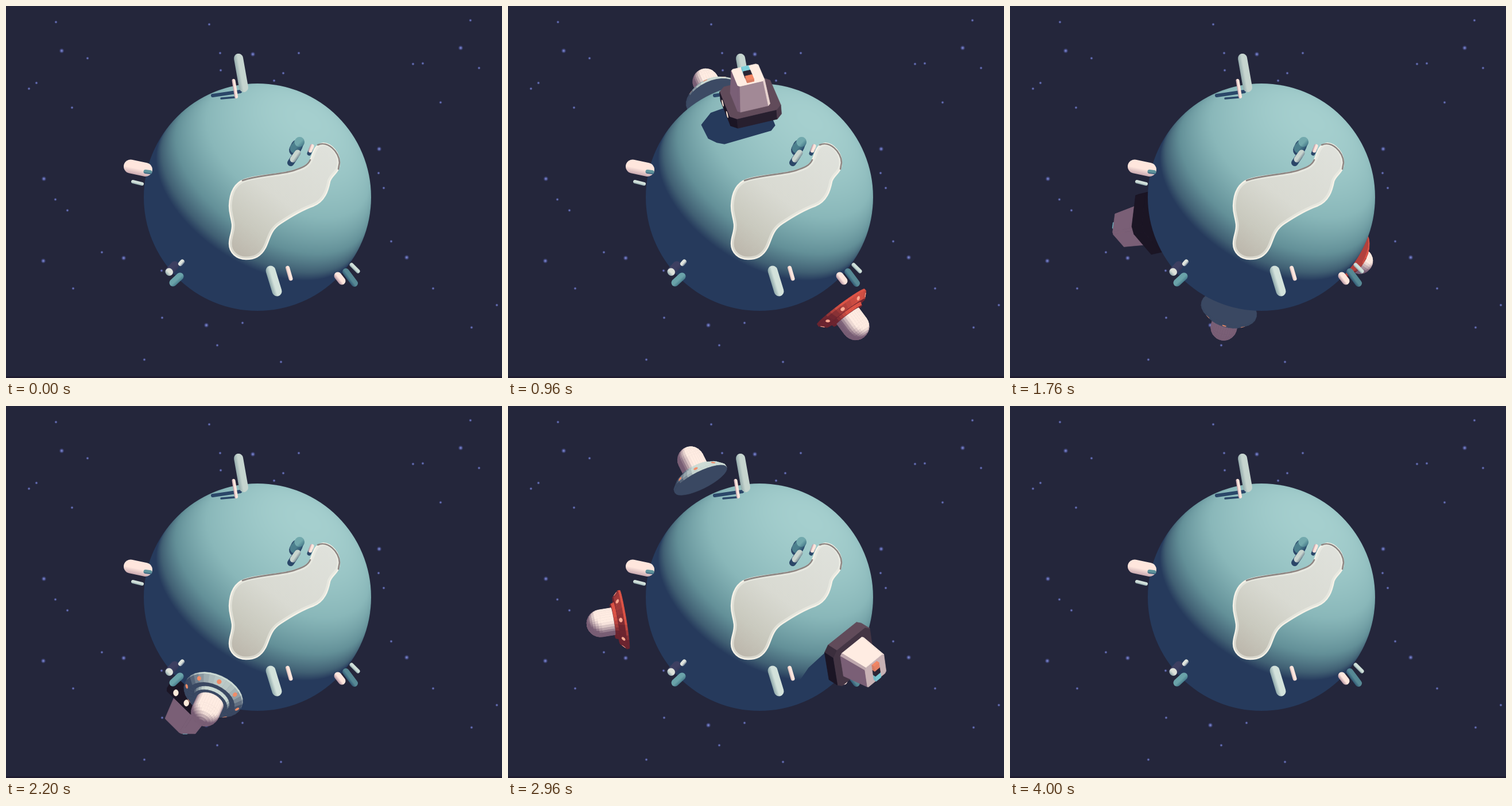
Write an HTML page with a canvas that moves like this. It is 864 px wide and 648 px high and loops after 4.04 s.

```html
<!DOCTYPE html>
<html lang="en">
<head>
<meta charset="utf-8">
<title>Little planet</title>
<style>
html, body { margin: 0; width: 100%; height: 100%; overflow: hidden; background: #24263b; }
canvas { display: block; }
</style>
</head>
<body>
<canvas id="stage" width="864" height="648"></canvas>
<script>
const W = 864, H = 648, CX = 438, CY = 333, R = 198, LOOP = 4.04, TAU = Math.PI * 2;
const NAVY = [38, 58, 92];
const ctx = document.getElementById('stage').getContext('2d');

// ---------- helpers ----------
const dot = (a, b) => a[0] * b[0] + a[1] * b[1] + a[2] * b[2];
const sub = (a, b) => a.map((v, i) => v - b[i]);
const cross = (a, b) => [a[1] * b[2] - a[2] * b[1], a[2] * b[0] - a[0] * b[2], a[0] * b[1] - a[1] * b[0]];
const unit = a => { const l = Math.hypot(...a) || 1; return a.map(v => v / l); };
const blend = (a, p, b, q) => a.map((v, i) => v * p + b[i] * q);
const mix = (a, b, k) => blend(a, 1 - k, b, k);
const clamp = v => Math.max(0, Math.min(1, v));
const rgb = c => `rgb(${c.map(Math.round)})`;
const LIGHT = unit([.45, -.68, .58]);

function layer(paint) {
  const c = document.createElement('canvas');
  c.width = W; c.height = H;
  paint(c.getContext('2d'));
  return c;
}

function planetClip(g) {
  g.beginPath();
  g.arc(CX, CY, R, 0, TAU);
  g.clip();
}

// ---------- sky ----------
const bigStars = [97,78, 430,84, 792,73, 650,249, 66,301, 65,444, 205,439, 349,556, 698,438];
const smallStars = [87,28, 354,32, 142,91, 373,82, 374,112, 510,82, 483,117, 467,130, 709,101, 726,100,
  824,108, 809,25, 757,168, 53,134, 40,144, 115,177, 649,291, 658,317, 86,337, 107,356, 167,429, 117,492,
  271,461, 272,543, 412,552, 368,591, 241,616, 479,620, 671,410, 744,492, 855,521, 811,560];

const sky = layer(g => {
  g.fillStyle = '#24263b';
  g.fillRect(0, 0, W, H);
  g.fillStyle = '#1e1b2f';
  g.fillRect(0, 645, W, 3);
  const star = (x, y, r) => {
    const glow = g.createRadialGradient(x, y, 0, x, y, r);
    glow.addColorStop(0, 'rgba(142,152,226,1)');
    glow.addColorStop(.4, 'rgba(104,114,192,.75)');
    glow.addColorStop(1, 'rgba(70,78,150,0)');
    g.fillStyle = glow;
    g.fillRect(x - r, y - r, 2 * r, 2 * r);
  };
  for (let i = 0; i < bigStars.length; i += 2) star(bigStars[i], bigStars[i + 1], 4.6);
  for (let i = 0; i < smallStars.length; i += 2) star(smallStars[i], smallStars[i + 1], 2.9);
});

// ---------- planet ----------
const ramp = [[0, NAVY], [.1, [64, 95, 115]], [.3, [99, 144, 152]], [.6, [137, 183, 185]], [1, [165, 207, 206]]];

function rampColor(d) {
  if (d <= 0) return NAVY;
  const i = ramp.findIndex(s => s[0] >= d);
  if (i < 1) return ramp[ramp.length - 1][1];
  const [a, ca] = ramp[i - 1], [b, cb] = ramp[i];
  return mix(ca, cb, (d - a) / (b - a));
}

const planet = layer(g => {
  const size = 2 * R + 4, img = g.createImageData(size, size);
  for (let j = 0; j < size; j++) for (let i = 0; i < size; i++) {
    let x = (i - R - 1.5) / R, y = (j - R - 1.5) / R;
    const q = Math.max(1, Math.hypot(x, y));
    x /= q; y /= q;
    const z = Math.sqrt(Math.max(0, 1 - x * x - y * y));
    const c = rampColor(dot([x, y, z], LIGHT));
    img.data.set([c[0], c[1], c[2], 255], (j * size + i) * 4);
  }
  const raw = layer(o => o.putImageData(img, CX - R - 2, CY - R - 2));
  planetClip(g);
  g.drawImage(raw, 0, 0);
});

// ---------- crater and pillars ----------
function capsule(g, x1, y1, x2, y2, w, lit, dark) {
  const a = Math.atan2(y2 - y1, x2 - x1), len = Math.hypot(x2 - x1, y2 - y1), r = w / 2;
  // Shade across the pillar, bright on the side facing the light.
  const side = Math.sin(a) * -LIGHT[0] + Math.cos(a) * LIGHT[1] > 0 ? 1 : -1;
  const shade = g.createLinearGradient(0, side * r, 0, -side * r);
  shade.addColorStop(0, lit);
  shade.addColorStop(.55, lit);
  shade.addColorStop(1, dark);
  g.save();
  g.translate(x1, y1);
  g.rotate(a);
  g.fillStyle = shade;
  g.beginPath();
  g.roundRect(-r, -r, len + w, w, r);
  g.fill();
  g.restore();
}

function stroke(g, path, color, width) {
  g.strokeStyle = color;
  g.lineWidth = width;
  g.stroke(path);
}

const decor = layer(g => {
  g.lineCap = 'round';
  const crater = new Path2D('M553 239C568 240 581 256 581 273C581 291 567 294 564 306C561 322 555 340 536 348' +
    'C516 355 496 367 478 379C460 391 460 405 452 421C444 436 433 441 418 441C402 441 389 430 389 414' +
    'C389 400 395 394 394 380C392 365 389 362 389 348C390 322 399 308 416 302C440 294 476 294 500 287' +
    'C515 282 525 279 530 268C536 255 537 241 553 239Z');
  const floor = g.createLinearGradient(560, 250, 420, 440);
  floor.addColorStop(0, '#dfe1db');
  floor.addColorStop(.5, '#d9dad2');
  floor.addColorStop(.8, '#c9c9be');
  floor.addColorStop(1, '#bdb8ad');
  g.fillStyle = floor;
  g.fill(crater);
  g.save();
  g.clip(crater);
  stroke(g, crater, 'rgba(240,240,232,.55)', 9);
  g.restore();
  stroke(g, crater, '#f6f2e8', 2.4);
  stroke(g, new Path2D('M412 304C440 294 476 294 500 287C515 282 525 279 530 268M543 242C560 234 581 254 581 273L579 284'),
    '#8d8582', 2.6);

  const shadow = (d, w) => stroke(g, new Path2D(d), '#2b4769', w);
  g.save();
  planetClip(g);
  shadow('M360 156L408 149', 6);
  shadow('M375 161L398 159', 3.5);
  shadow('M507 243L503 251', 20);
  shadow('M504 261L496 273', 12);
  shadow('M531 250L528 257', 7);
  g.restore();

  const pale = '#cfdfd9', grey = '#8ba5a8', pink = '#ffe6dd', mauve = '#b493a0';
  capsule(g, 414, 142, 405, 91, 16, '#c6d5cf', '#93aaab');
  capsule(g, 401, 158, 396.5, 130, 6, pink, mauve);
  capsule(g, 243, 285, 217, 279.5, 24, pink, '#c9a9b0');
  capsule(g, 243, 288.5, 251, 289.5, 7, '#5f949c', '#34597a');
  capsule(g, 237, 310, 221, 306, 6, '#d2e0da', grey);
  capsule(g, 511, 238, 503, 248, 17, '#4c7f8d', '#315873');
  capsule(g, 511, 237, 511.5, 236.5, 17, '#72a9ad', '#487d8c');
  capsule(g, 500, 267, 508, 256, 11, '#c9d5cf', '#7d8f98');
  capsule(g, 530, 252, 533, 244, 7, pink, mauve);
  capsule(g, 294, 452, 285, 462, 15, '#3d3f61', '#343859');
  capsule(g, 284, 463, 284.5, 463.5, 13, '#dde2da', grey);
  capsule(g, 304, 449, 307, 445.5, 8, '#dfe4dd', '#6b7d93');
  capsule(g, 303, 471, 291, 482, 13, '#6aa3a9', '#477b8b');
  capsule(g, 461, 461, 472, 497, 17, '#d3e2db', grey);
  capsule(g, 490.5, 456, 496, 475, 7, pink, '#cfb5b3');
  capsule(g, 578, 470, 585, 479, 13, pink, mauve);
  capsule(g, 592, 463, 607, 483, 12, '#568894', '#2f5672');
  capsule(g, 602, 451, 613, 462, 7, pale, grey);
});

// ---------- ship models: parts stacked along the up axis, points are [x, height, front] ----------
const SKIN = { lit: [255, 236, 226], dark: [122, 95, 118] };
const PALE = { lit: [205, 219, 213], dark: [58, 72, 98] };
const RED = { lit: [222, 84, 70], dark: [108, 37, 48] };
const PLUM = { lit: [97, 75, 90], dark: [27, 21, 36] };
const glow = c => ({ lit: c, dark: c });

function face(pts, mat, inside) {
  const mid = pts.reduce((s, p) => blend(s, 1, p, 1 / pts.length), [0, 0, 0]);
  let n = unit(cross(sub(pts[1], pts[0]), sub(pts[2], pts[0])));
  if (dot(n, sub(mid, inside)) < 0) n = n.map(v => -v);
  return { pts, mat, n, mid };
}

const ring = (n, fn) => Array.from({ length: n }, (_, i) => fn(i / n * TAU));

function saucer(hull, lamp) {
  const SEG = 32, dome = 23.5;
  const profile = [[51, 0], [51, 4], [41, 14], [32, 14], [30, 20], [dome, 20], [dome, 42]];
  for (let i = 1; i <= 7; i++) {
    const a = i / 7 * TAU / 4;
    profile.push([dome * Math.cos(a), 42 + dome * Math.sin(a)]);
  }
  const at = (r, h, a) => [r * Math.cos(a), h, r * Math.sin(a)];
  const parts = [[face(ring(SEG, a => at(51, 0, a)), hull, [0, 9, 0])]];
  for (let i = 1; i < profile.length; i++) {
    const [r1, h1] = profile[i - 1], [r2, h2] = profile[i];
    const inside = [0, (h1 + h2) / 2 - 4, 0], mat = i > 5 ? SKIN : hull;
    parts.push(ring(SEG, a => {
      const b = a + TAU / SEG;
      return face([at(r1, h1, a), at(r1, h1, b), at(r2, h2, b), at(r2, h2, a)], mat, inside);
    }));
  }
  parts[2].push(...ring(8, a => face(ring(10, b => {
    const k = Math.sin(b) * 2.6;
    return at(46 - k, 9 + k, a + Math.cos(b) * .08);
  }), glow(lamp), [0, 5, 0])));
  return parts;
}

const foot = (w, d, c) => [[w - c, d], [w, d - c], [w, c - d], [w - c, -d], [c - w, -d], [-w, c - d], [-w, d - c], [c - w, d]];

function prism(base, h0, h1, taper, mat, dx = 0) {
  const low = base.map(([x, f]) => [x + dx, h0, f]);
  const top = base.map(([x, f]) => [x * taper + dx, h1, f * taper]);
  const inside = [dx, (h0 + h1) / 2, 0];
  return [face(low, mat, inside), face(top, mat, inside), ...low.map((p, i) => {
    const j = (i + 1) % low.length;
    return face([p, low[j], top[j], top[i]], mat, inside);
  })];
}

function truck() {
  const base = prism(foot(43, 44, 10), 0, 20, 1, PLUM);
  for (const x of [-15, 15])
    base.push(face(ring(14, a => [x + 5.6 * Math.cos(a), 10 + 5.6 * Math.sin(a), 44.2]), glow([255, 234, 218]), [0, 10, 0]));
  const colors = [[125, 208, 218], [42, 35, 50], [243, 134, 100]];
  return [base, prism(foot(28, 28, 4), 20, 71, .83, SKIN),
    colors.flatMap((c, i) => prism(foot(6, 6, .5), 71, 76, 1, { lit: c, dark: mix(c, NAVY, .15) }, i * 12 - 12))];
}

// Keys: seconds, direction from the planet's centre, turn in degrees.
const ships = [
  { alt: 238, parts: saucer(PALE, [240, 140, 104]), spin: 180, keys: [
    [0, .2, 0, -.98], [.64, 0, -.74, -.67], [1.28, -.736, -.51, -.445], [1.54, -.9, .25, -.35],
    [1.76, -.243, .84, -.48], [2, -.15, .95, .2], [2.56, -.45, -.357, .82], [2.9, -.45, -.87, -.1], [3.36, -.2, -.4, -.9]] },
  { alt: 238, parts: saucer(RED, [255, 172, 148]), spin: 180, keys: [
    [0, .12, .5, -.86], [.64, .186, .98, -.1], [1.28, .886, .43, .17], [1.76, .646, .418, -.64], [2.3, 0, .1, -1],
    [2.56, -.5, 0, -.87], [2.8, -.95, .05, -.3], [2.95, -.98, .15, .1], [3.36, -.24, .575, .78], [3.7, .1, .98, .2]] },
  { alt: 210, parts: truck(), spin: 720, keys: [
    [0, .25, -.35, -.9, -55], [.64, .43, -.88, .2, 35], [1.28, -.63, -.24, .74, 127], [1.76, -.9, .21, -.37, 230],
    [2.56, .06, 1, .03, 405], [3, .72, .35, .6, 490], [3.36, .73, -.6, .3, 570], [3.7, .6, -.65, -.5, 615]] }
];

// Smooth periodic curve through the keys.
function sample({ keys, spin }, t) {
  const n = keys.length;
  const key = i => {
    const lap = Math.floor(i / n), k = keys[i - lap * n];
    return [k[0] + lap * LOOP, k[1], k[2], k[3], (k[4] || 0) + lap * spin];
  };
  let i = n - 1;
  while (keys[i][0] > t) i--;
  const [a, b, c, d] = [-1, 0, 1, 2].map(o => key(i + o));
  const span = c[0] - b[0], s = (t - b[0]) / span, s2 = s * s, s3 = s2 * s;
  return [1, 2, 3, 4].map(j => {
    const m0 = (c[j] - a[j]) / (c[0] - a[0]) * span, m1 = (d[j] - b[j]) / (d[0] - b[0]) * span;
    return (2 * s3 - 3 * s2 + 1) * b[j] + (s3 - 2 * s2 + s) * m0 + (3 * s2 - 2 * s3) * c[j] + (s3 - s2) * m1;
  });
}

function pose(ship, t) {
  const [x, y, z, deg] = sample(ship, t);
  const up = unit([x, y, z]), e1 = unit([-up[1], up[0], 0]), e2 = cross(up, e1);
  const c = Math.cos(deg / 360 * TAU), s = Math.sin(deg / 360 * TAU);
  const X = blend(e1, c, e2, s), F = blend(e2, c, e1, -s);
  const turn = p => up.map((u, i) => X[i] * p[0] + u * p[1] + F[i] * p[2]);
  const place = p => turn([p[0], p[1] + ship.alt, p[2]]);
  return { ship, up, turn, place };
}

const project = p => { const k = 1 + p[2] / 3500; return [CX + p[0] * k, CY + p[1] * k]; };

function tracePolygon(pts) {
  ctx.beginPath();
  pts.forEach(p => ctx.lineTo(p[0], p[1]));
  ctx.closePath();
}

function eclipsed(p) {
  const d = dot(p, LIGHT);
  return d < 0 && dot(p, p) - d * d < R * R;
}

function drawShip({ ship, up, turn, place }) {
  const parts = up[2] > 0 ? ship.parts : [...ship.parts].reverse();
  ctx.lineWidth = .7;
  ctx.lineJoin = 'round';
  for (const f of parts.flat()) {
    const n = turn(f.n);
    if (n[2] <= 0) continue;
    const lit = eclipsed(place(f.mid)) ? 0 : clamp(dot(n, LIGHT) * 1.5 + .06);
    ctx.fillStyle = ctx.strokeStyle = rgb(mix(f.mat.dark, f.mat.lit, lit));
    tracePolygon(f.pts.map(p => project(place(p))));
    ctx.fill();
    ctx.stroke();
  }
}

function hullOf(pts) {
  pts.sort((a, b) => a[0] - b[0] || a[1] - b[1]);
  const half = list => {
    const out = [];
    for (const p of list) {
      while (out.length > 1) {
        const [a, b] = out.slice(-2);
        if ((b[0] - a[0]) * (p[1] - a[1]) - (b[1] - a[1]) * (p[0] - a[0]) > 0) break;
        out.pop();
      }
      out.push(p);
    }
    return out.slice(0, -1);
  };
  return [...half(pts), ...half([...pts].reverse())];
}

function drawShadow({ ship, place }) {
  const spots = [];
  for (const f of ship.parts.flat()) for (const v of f.pts) {
    const p = place(v), d = dot(p, LIGHT);
    if (d <= 0) continue;
    let q = blend(p, 1, LIGHT, -d);
    const far = Math.hypot(...q);
    if (far > R) q = q.map(c => c * R / far);
    const hit = blend(q, 1, LIGHT, Math.sqrt(Math.max(0, R * R - dot(q, q))));
    if (hit[2] > 0) spots.push([CX + hit[0], CY + hit[1]]);
  }
  if (spots.length < 3) return;
  ctx.fillStyle = rgb(NAVY);
  tracePolygon(hullOf(spots));
  ctx.fill();
}

function render(t) {
  const poses = ships.map(s => pose(s, t)).sort((a, b) => a.up[2] - b.up[2]);
  ctx.drawImage(sky, 0, 0);
  poses.filter(p => p.up[2] < 0).forEach(drawShip);
  ctx.drawImage(planet, 0, 0);
  ctx.save();
  planetClip(ctx);
  poses.forEach(drawShadow);
  ctx.restore();
  ctx.drawImage(decor, 0, 0);
  poses.filter(p => p.up[2] >= 0).forEach(drawShip);
}

function tick() {
  const ms = performance.now() % (LOOP * 1000);
  render(Math.floor(ms / 40) * .04);
  requestAnimationFrame(tick);
}
tick();
</script>
</body>
</html>
```
